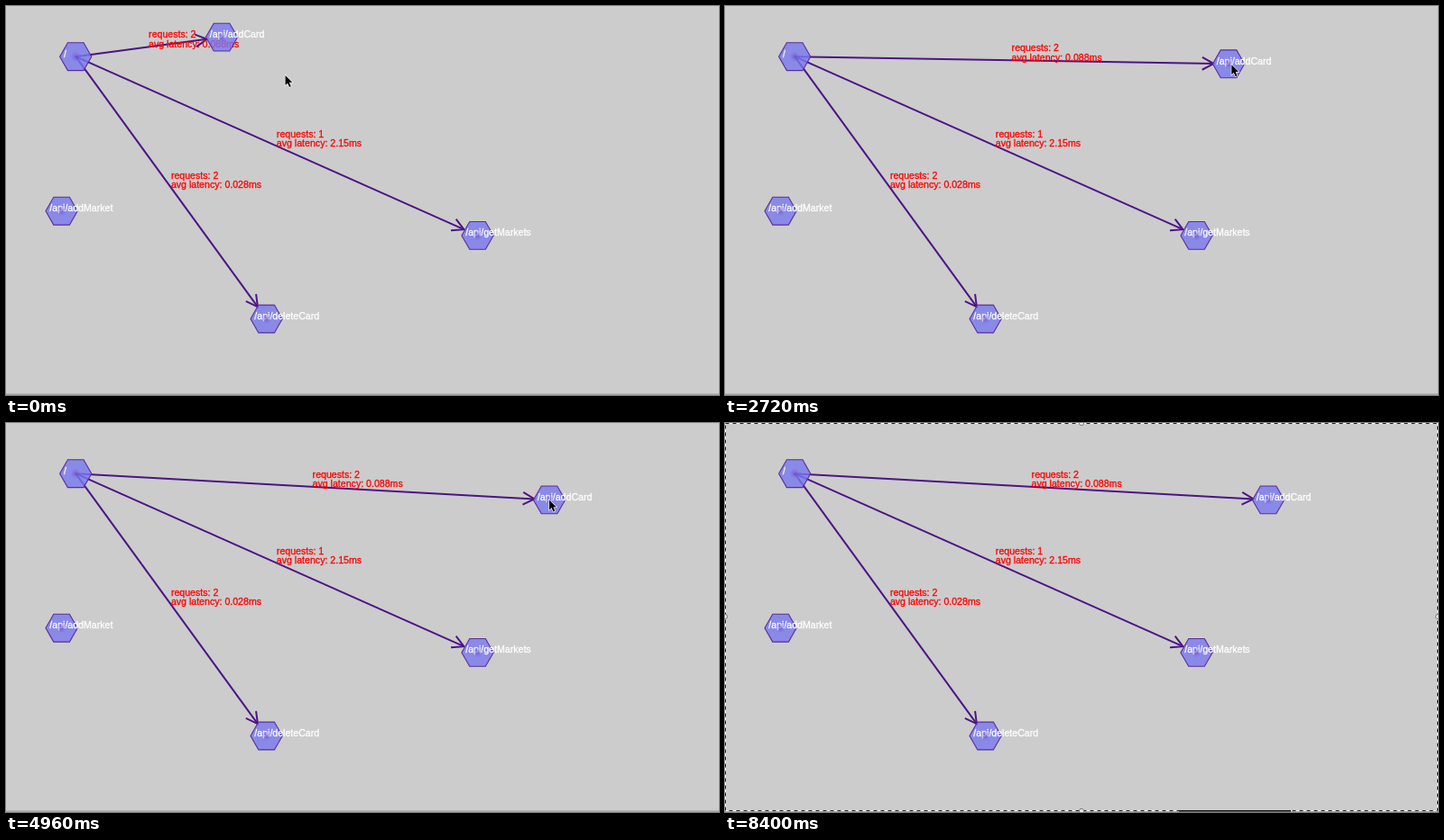
An HTML page with a canvas that plays this animation: 790x432 px, repeating every 8480 ms.

```html
<!DOCTYPE html>
<html lang="en">
<head>
<meta charset="utf-8">
<title>Route graph</title>
<style>
  html, body { margin: 0; width: 100%; height: 100%; overflow: hidden; background: #ccc; }
  canvas { display: block; width: 790px; height: 432px; }
</style>
</head>
<body>
<canvas id="stage"></canvas>
<script>
const W = 790, H = 432, LOOP = 8480, STEP = 80;
const GRAB = 1200, DROP = 4640, LEAVE = 7040, EXIT = 8000;
const LEAD = 60; // ms the pointer runs ahead of the dragged node
const canvas = document.getElementById('stage');
const ctx = canvas.getContext('2d');
const ratio = window.devicePixelRatio || 1;
canvas.width = W * ratio;
canvas.height = H * ratio;

const node = (label, x, y) => ({ label, x, y });
const root = node('/', 77.2, 56.2);
const addCard = node('/api/addCard', 239, 34.6);
const addMarket = node('/api/addMarket', 61.6, 227.7);
const getMarkets = node('/api/getMarkets', 522.5, 254.9);
const deleteCard = node('/api/deleteCard', 288.6, 347.5);
const nodes = [root, addCard, addMarket, getMarkets, deleteCard];
const edges = [
  { to: addCard, requests: 2, latency: '0.088' },
  { to: getMarkets, requests: 1, latency: '2.15' },
  { to: deleteCard, requests: 2, latency: '0.028' }
];

const start = { x: 309.5, y: 77 };
const exit = { x: 568, y: 440 };
const drag = [
  { t: GRAB, x: 239, y: 34.6 },
  { t: 1520, x: 262.5, y: 35.2 },
  { t: 2000, x: 430, y: 52 },
  { t: 2720, x: 558, y: 64.3 },
  { t: 3920, x: 598, y: 83.5 },
  { t: DROP, x: 602, y: 85.4 }
];

// Monotone cubic through the key points
function along(keys, t, axis) {
  const last = keys.length - 1;
  if (t <= keys[0].t) return keys[0][axis];
  if (t >= keys[last].t) return keys[last][axis];
  let i = 0;
  while (t >= keys[i + 1].t) i++;
  const secant = k => (keys[k + 1][axis] - keys[k][axis]) / (keys[k + 1].t - keys[k].t);
  const slope = k => {
    if (k === 0 || k === last) return 0;
    const a = secant(k - 1), b = secant(k);
    return a * b > 0 ? 2 * a * b / (a + b) : 0;
  };
  const h = keys[i + 1].t - keys[i].t;
  const u = (t - keys[i].t) / h, v = 1 - u;
  return v * v * (1 + 2 * u) * keys[i][axis] + u * u * (3 - 2 * u) * keys[i + 1][axis]
    + h * u * v * (v * slope(i) - u * slope(i + 1));
}

const dragAt = t => ({ x: along(drag, t, 'x'), y: along(drag, t, 'y') });

function glide(from, to, u) {
  const e = u * u * (3 - 2 * u);
  return { x: from.x + (to.x - from.x) * e, y: from.y + (to.y - from.y) * e };
}

function cursorAt(t) {
  if (t < 880) return glide(start, drag[0], t / 880);
  if (t < LEAVE) return dragAt(t + LEAD);
  return glide(dragAt(DROP), exit, Math.min(1, (t - LEAVE) / (EXIT - LEAVE)));
}

function trace(points, close) {
  ctx.beginPath();
  for (const [x, y] of points) ctx.lineTo(x, y);
  if (close) ctx.closePath();
}

function write(text, x, y, color) {
  ctx.fillStyle = ctx.strokeStyle = color;
  ctx.lineWidth = 0.3;
  ctx.fillText(text, x, y);
  ctx.strokeText(text, x, y);
}

function drawEdge({ to }) {
  const a = Math.atan2(to.y - root.y, to.x - root.x);
  const x = to.x - 16.5 * Math.cos(a), y = to.y - 16.5 * Math.sin(a);
  const barb = turn => [x - 14.5 * Math.cos(a + turn), y - 14.5 * Math.sin(a + turn)];
  ctx.strokeStyle = '#4b1585';
  ctx.lineWidth = 2;
  trace([[root.x, root.y], [x, y]]);
  ctx.stroke();
  trace([barb(0.5), [x, y], barb(-0.5)]);
  ctx.stroke();
}

function drawStats({ to, requests, latency }) {
  const x = (root.x + to.x) / 2, y = (root.y + to.y) / 2;
  write('requests: ' + requests, x, y - 10, '#f00');
  write('avg latency: ' + latency + 'ms', x, y + 0.6, '#f00');
}

function drawNode({ x, y, label }) {
  const corners = Array.from({ length: 6 }, (_, k) => {
    const a = k * Math.PI / 3;
    return [x + 17.6 * Math.cos(a), y + 17.8 * Math.sin(a)];
  });
  trace(corners, true);
  ctx.fillStyle = 'rgba(120,120,239,0.8)';
  ctx.fill();
  ctx.strokeStyle = '#5a2c9c';
  ctx.lineWidth = 1.1;
  ctx.stroke();

  write(label, x - 13.3, y + 0.4, '#fff');

  const r = 6, glow = ctx.createRadialGradient(x, y, 0, x, y, r);
  glow.addColorStop(0, 'rgba(108,64,188,0.6)');
  glow.addColorStop(1, 'rgba(120,100,220,0)');
  ctx.fillStyle = glow;
  ctx.fillRect(x - r, y - r, 2 * r, 2 * r);
}

function drawCursor({ x, y }) {
  ctx.save();
  ctx.translate(x, y);
  trace([[0, 0], [0, 11], [2.5, 8.7], [4.4, 13], [6.2, 12.2], [4.4, 8], [7.7, 7.8]], true);
  ctx.strokeStyle = '#fff';
  ctx.lineWidth = 1.2;
  ctx.stroke();
  ctx.fillStyle = '#000';
  ctx.fill();
  ctx.restore();
}

function drawSelection() {
  const frame = color => {
    ctx.strokeStyle = color;
    ctx.strokeRect(0.5, 0.5, W - 1, H - 2);
  };
  ctx.lineWidth = 1;
  frame('#fff');
  ctx.setLineDash([4, 4]);
  frame('#222');
  ctx.setLineDash([]);
  for (const [x, y] of [[W / 2, 0], [W / 2, H - 1], [0, H / 2 - 1], [W, H / 2 - 1]]) {
    ctx.beginPath();
    ctx.arc(x, y, 2.6, 0, 2 * Math.PI);
    ctx.fillStyle = '#eee';
    ctx.fill();
    ctx.strokeStyle = '#777';
    ctx.stroke();
  }
}

function draw(t) {
  ctx.setTransform(ratio, 0, 0, ratio, 0, 0);
  ctx.font = '10.6px "Liberation Sans", Arial, sans-serif';
  ctx.lineJoin = 'round';
  ctx.fillStyle = '#ccc';
  ctx.fillRect(0, 0, W, H);
  ctx.fillStyle = '#a6a6a6';
  ctx.fillRect(0, 430.4, W, 1.6);
  ctx.lineJoin = 'miter';

  Object.assign(addCard, dragAt(t));
  edges.forEach(drawEdge);
  edges.forEach(drawStats);
  nodes.forEach(drawNode);

  if (t >= 7600) drawSelection();
  if (t >= EXIT) {
    ctx.fillStyle = '#111';
    ctx.fillRect(503, 430, 124, 1.5);
  }
  drawCursor(cursorAt(t));
}

function tick() {
  const t = performance.now() % LOOP;
  draw(Math.floor(t / STEP) * STEP);
  requestAnimationFrame(tick);
}
tick();
</script>
</body>
</html>
```
